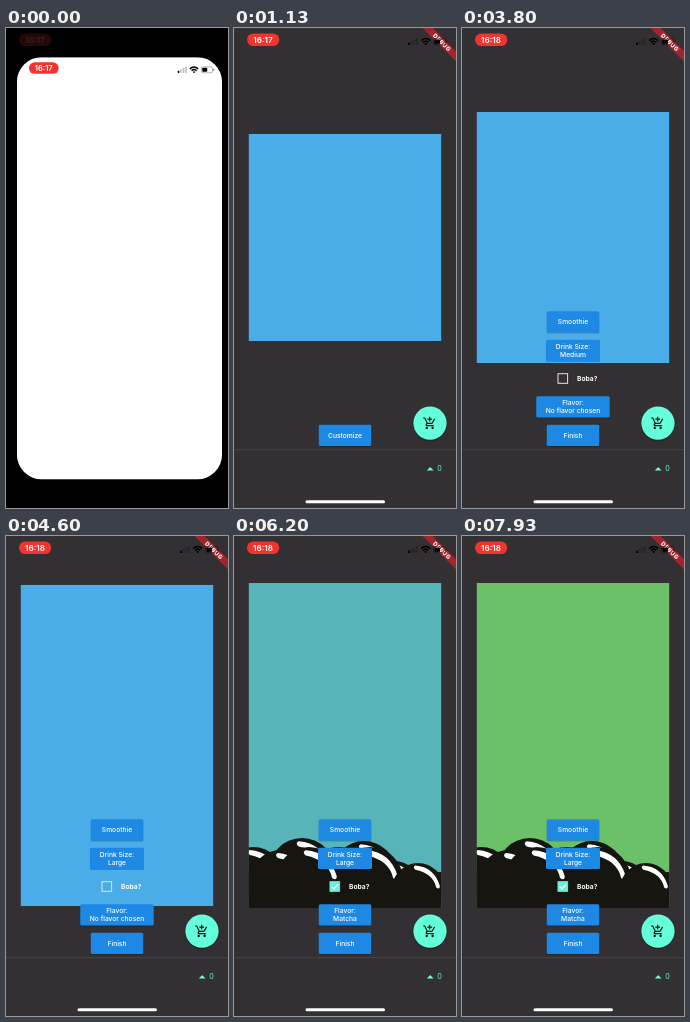
An HTML page that plays this animation: 222x480 px, repeating every 8 s.

```html
<!DOCTYPE html>
<html lang="en">
<head>
<meta charset="utf-8">
<title>Drink builder</title>
<style>
html, body { margin: 0; width: 100%; height: 100%; overflow: hidden; background: #000; }
svg { display: block; width: 100vw; height: 100vh; }
text { font-family: Inter, sans-serif; text-anchor: middle; }
.btn text { font-size: 6.7px; font-weight: 500; fill: #fff; }
.clock { font-size: 8.2px; font-weight: 600; fill: #fff; }
</style>
</head>
<body>
<svg id="stage" viewBox="0 0 222 480"></svg>
<script>
const LOOP = 8000;
const stage = document.getElementById('stage');
const $ = id => document.getElementById(id);
const set = (id, attrs) => {
  for (const k in attrs) $(id).setAttribute(k, attrs[k]);
};
const clamp = v => Math.max(0, Math.min(1, v));
const span = (t, a, b) => clamp((t - a) / (b - a));
const easeOut = p => 1 - (1 - p) ** 3;
const smooth = p => p * p * (3 - 2 * p);
const mix = (a, b, p) => a + (b - a) * p;
const mixColor = (a, b, p) => `rgb(${a.map((v, i) => Math.round(mix(v, b[i], p)))})`;

const BLUE = [74, 173, 232], GREEN = [108, 192, 104];
const SMALL = 207, MEDIUM = 251, LARGE = 325;

// Back to front: falling x, y, r; resting x, y, r; shine
const pearls = [
  [18, 208, 29, 10, 352, 30, 0],
  [85, 232, 32, 105, 343, 32, 0],
  [25, 182, 31, 19, 342, 31, 1],
  [-2, 180, 31, -14, 348, 31, 1],
  [85, 197, 32, 68, 335, 33, 1],
  [112, 205, 33, 130, 337, 32, 1],
  [48, 193, 31, 47, 345, 31, 1],
  [72, 219, 33, 75, 344, 33, 1],
  [157, 220, 24, 160, 352, 27, 1],
  [134, 240, 33, 136, 344, 33, 1],
  [210, 235, 30, 206, 364, 28, 0],
  [185, 207, 27, 184, 353, 26, 1]
];

function button(id, y, w, lines) {
  const labels = lines.map((s, i) =>
    `<text id="${id}${i}" x="111" y="${lines.length > 1 ? y + 8.8 + i * 8.2 : y + 13}">${s}</text>`);
  return `<g id="${id}" class="btn">
    <rect id="${id}Shade" x="${111 - w / 2}" y="${y + 1}" width="${w}" height="21.3" rx="1.5" opacity=".22"/>
    <rect id="${id}Face" x="${111 - w / 2}" y="${y}" width="${w}" height="21.3" rx="1.5" fill="#1e88e5"/>
    ${labels.join('')}</g>`;
}

const icons = `
  <rect x="174" y="14.5" width="1.8" height="2.5" rx=".5"/>
  <g opacity=".25"><rect x="176.7" y="13" width="1.8" height="4" rx=".5"/>
    <rect x="179.4" y="11.5" width="1.8" height="5.5" rx=".5"/>
    <rect x="182.1" y="10" width="1.8" height="7" rx=".5"/></g>
  <g fill="none" stroke="#000" stroke-width="1.5">
    <path d="M187.2 12.6Q191.7 8.4 196.2 12.6M189 14.5Q191.7 12.1 194.4 14.5"/></g>
  <path d="M190.2 15.7Q191.7 14.5 193.2 15.7L191.7 17.2Z"/>
  <rect x="199.6" y="10.4" width="12" height="6.4" rx="1.8" fill="none" stroke="#000" stroke-opacity=".45" stroke-width=".7"/>
  <rect x="200.6" y="11.4" width="5.4" height="4.4" rx=".9"/>
  <rect x="212.4" y="12.4" width="1" height="2.4" rx=".5" opacity=".5"/>`;

const status = id => `<rect x="13" y="5.4" width="32.3" height="12.6" rx="6.3" fill="#f0342e"/>
  <text id="${id}" class="clock" x="29" y="14.6">16:17</text>${icons}`;

const cart = 'M11 9h2V6h3V4h-3V1h-2v3H8v2h3v3zm-4 9c-1.1 0-2 .9-2 2s.9 2 2 2 2-.9 2-2-.9-2-2-2zm10 0c-1.1 0-2 .9-2 2s.9 2 2 2 2-.9 2-2-.9-2-2-2zm-9.8-3.3l.9-1.7h7.4c.8 0 1.4-.4 1.8-1l3.9-7L19.4 4l-3.9 7h-7L4.3 2H1v2h2l3.6 7.6-1.4 2.4c-.1.3-.2.6-.2 1 0 1.1.9 2 2 2h12v-2H7.4z';

const shine = '<path d="M-.1-.9Q.62-.84 .84-.12Q.84.04 .7-.06Q.58-.6 -.1-.74Q-.22-.84 -.1-.9Z" fill="#fff"/>';

stage.innerHTML = `
<defs>
  <clipPath id="cardClip"><rect id="cardShape"/></clipPath>
  <clipPath id="cupClip"><rect id="cupShape" x="14.8" width="192.4"/></clipPath>
</defs>
<rect width="222" height="480"/>
<g id="ghost">${status('ghostClock')}</g>
<g clip-path="url(#cardClip)"><g id="screen">
  <rect width="222" height="490" fill="#323032"/>
  <rect id="cup" x="14.8" width="192.4"/>
  <g id="boba" clip-path="url(#cupClip)">${pearls.map((p, i) => `
    <g id="pearl${i}"><circle r="1" fill="#16150f"/>${p[6] ? shine : ''}</g>`).join('')}
  </g>
  <path d="M0 421.7H222" stroke="#4b494b" stroke-width=".8"/>
  <path d="M192.8 442.5L196.2 439L199.6 442.5Z" fill="#64ffda"/>
  <text x="205.4" y="443.4" font-size="7.2" fill="#64ffda">0</text>
  <g id="options">
    ${button('kind', 283.3, 52.5, ['Smoothie'])}
    ${button('size', 311.7, 54, ['Drink Size:', 'Small'])}
    <rect id="check" x="96" y="345.7" width="9.6" height="9.6" stroke-width="1"/>
    <path id="tick" d="M97.8 350.6L100 352.8L104.2 348.4" fill="none" stroke="#fff" stroke-width="1.2"/>
    <text x="125.2" y="352.9" font-size="6.7" font-weight="700" fill="#fff">Boba?</text>
    ${button('flavor', 368.3, 73.5, ['Flavor:', 'No flavor chosen'])}
  </g>
  ${button('done', 396.8, 52.5, ['Customize'])}
  <circle cx="196" cy="396.4" r="16.8" opacity=".25"/>
  <circle cx="196" cy="395.2" r="16.6" fill="#64ffda"/>
  <path d="${cart}" transform="translate(188.6 388.2) scale(.591)" fill="#111"/>
  <rect id="veil" width="222" height="490" fill="#fff"/>
  <g id="banner" transform="translate(222 0) rotate(45)">
    <rect id="ribbon" x="-26" y="16.5" width="52" height="7.2" fill="#a3242a"/>
    <text x=".4" y="22.2" font-size="5.8" font-weight="800" letter-spacing=".5" fill="#fff">DEBUG</text>
  </g>
  ${status('clock')}
  <rect id="home" x="71.5" y="472.3" width="79.5" height="3" rx="1.5"/>
</g></g>`;

function drawCard(t) {
  const p = easeOut(span(t, 0, 330));
  const x = mix(11, 0, p), y = mix(29.5, 0, p);
  const w = mix(205, 222, p), h = mix(421.5, 480, p);
  set('cardShape', { x, y, width: w, height: h, rx: mix(25, 0, p) });
  set('screen', { transform: `translate(${x} ${y}) scale(${w / 222})` });
  set('ghost', { opacity: .16 * (1 - p) });

  const veil = 1 - span(t, 475, 780);
  set('veil', { opacity: veil });
  set('ribbon', { opacity: 1 - span(veil, .3, .8) });
  set('banner', { opacity: veil < 1 ? 1 : 0 });
  set('home', { fill: veil > .4 ? '#000' : '#fff', opacity: t < 330 ? 0 : 1 });
  $('clock').textContent = t < 3000 ? '16:17' : '16:18';
}

function drawCup(t) {
  const h = SMALL + (MEDIUM - SMALL) * smooth(span(t, 3400, 3700))
    + (LARGE - MEDIUM) * smooth(span(t, 4300, 4650));
  const box = { y: 209.5 - h / 2, height: h };
  set('cupShape', box);
  set('cup', { ...box, fill: mixColor(BLUE, GREEN, easeOut(span(t, 6100, 6800))) });
}

function drawBoba(t) {
  const lift = 2.9 * (1 - span(t, 4914, 5514) ** 2);
  set('boba', { opacity: t < 4914 ? 0 : 1 });
  pearls.forEach(([x1, y1, r1, x0, y0, r0], i) => {
    const x = mix(x0, x1, lift), y = mix(y0, y1, lift);
    const r = mix(r0, r1, Math.min(1, lift));
    set('pearl' + i, { transform: `translate(${x} ${y}) scale(${r})` });
  });
}

function drawForm(t) {
  const open = easeOut(span(t, 1650, 1950));
  set('options', { opacity: open, transform: `translate(0 ${24 * (1 - open)})` });
  $('done0').textContent = t < 1650 ? 'Customize' : 'Finish';
  $('size1').textContent = t < 3400 ? 'Small' : t < 4300 ? 'Medium' : 'Large';

  const checked = t >= 4850;
  set('check', { fill: checked ? '#6af0dc' : 'none', stroke: checked ? '#6af0dc' : '#e4e4e4' });
  set('tick', { opacity: checked ? 1 : 0 });

  const matcha = t >= 6100, w = matcha ? 52.5 : 73.5;
  $('flavor1').textContent = matcha ? 'Matcha' : 'No flavor chosen';
  for (const part of ['Face', 'Shade']) set('flavor' + part, { x: 111 - w / 2, width: w });
}

function render(t) {
  drawCard(t);
  drawCup(t);
  drawBoba(t);
  drawForm(t);
}

const start = performance.now();
function loop() {
  render((performance.now() - start) % LOOP);
  requestAnimationFrame(loop);
}
render(0);
requestAnimationFrame(loop);
</script>
</body>
</html>
```
